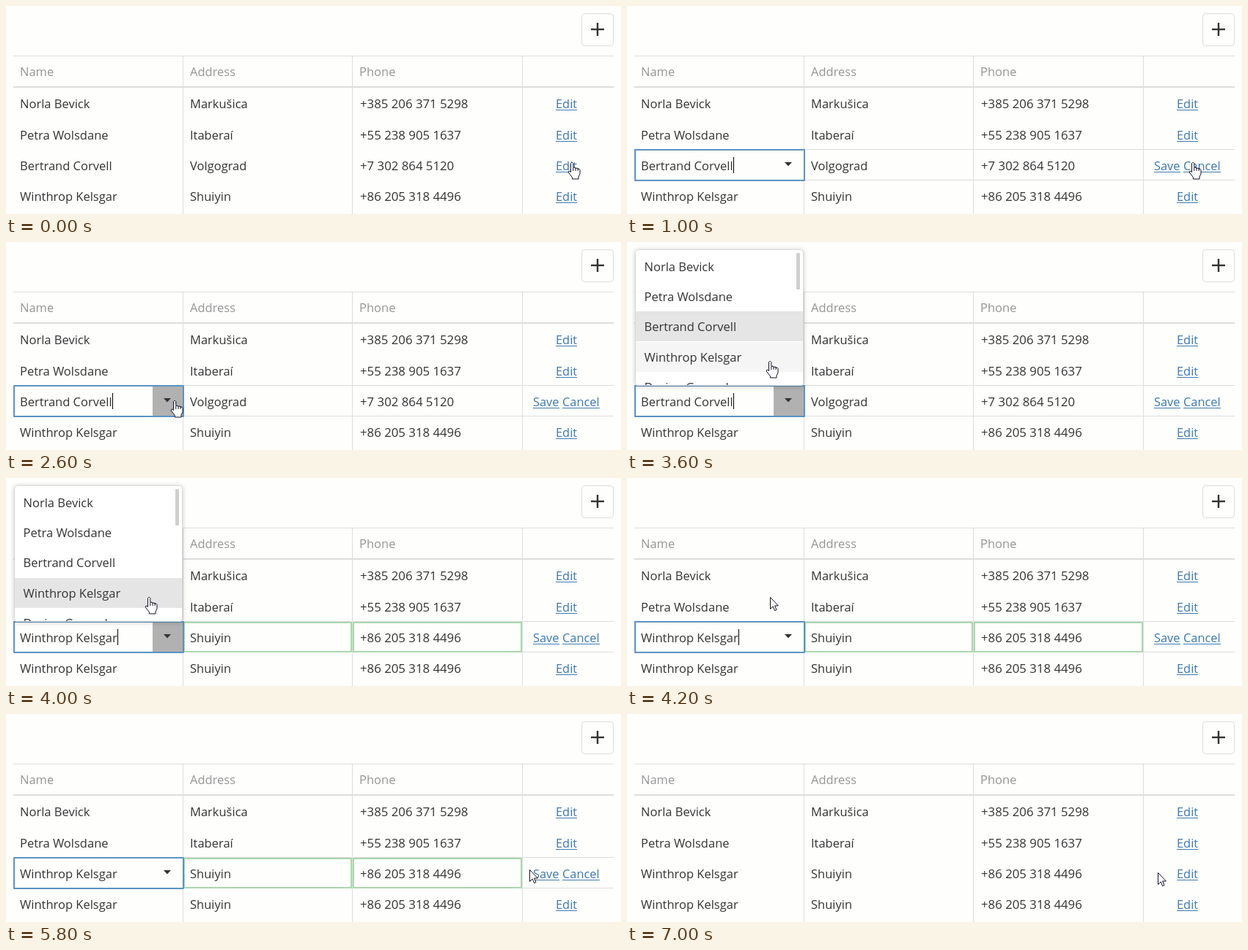
An HTML page with a canvas for the animation above (7.4 s loop, 839 by 285 pixels).

```html
<!DOCTYPE html>
<html lang="en">
<head>
<meta charset="utf-8">
<title>Editable grid</title>
<style>
html, body { margin: 0; width: 100%; height: 100%; overflow: hidden; background: #fefefd; }
canvas { display: block; width: 839px; height: 285px; }
</style>
</head>
<body>
<canvas id="stage"></canvas>
<script>
const W = 839, H = 285, LOOP = 7400;
const canvas = document.getElementById('stage');
const ctx = canvas.getContext('2d');
const dpr = window.devicePixelRatio || 1;
canvas.width = W * dpr;
canvas.height = H * dpr;

const LINE = '#dddddd', INK = '#333333', LINK = '#3c78b0', BG = '#fefefd';
const BASE = [140, 183, 225, 267];
const COL = [19, 251, 482];
const people = [
  ['Norla Bevick', 'Markušica', '+385 206 371 5298'],
  ['Petra Wolsdane', 'Itaberaí', '+55 238 905 1637'],
  ['Bertrand Corvell', 'Volgograd', '+7 302 864 5120'],
  ['Winthrop Kelsgar', 'Shuiyin', '+86 205 318 4496'],
  ['Dorina Gosmel']
];

function setFont(size) {
  ctx.font = size + 'px "Open Sans", "Noto Sans", sans-serif';
}

function text(str, x, y, color = INK, size = 16.5) {
  setFont(size);
  ctx.fillStyle = color;
  ctx.fillText(str, x, y);
  return ctx.measureText(str).width;
}

function link(str, x, y) {
  const w = text(str, x, y, LINK, 16.4);
  rect(x, y + 2, Math.round(w), 1, LINK);
}

function rect(x, y, w, h, color) {
  ctx.fillStyle = color;
  ctx.fillRect(x, y, w, h);
}

function frame(x, y, w, h, color) {
  ctx.strokeStyle = color;
  ctx.lineWidth = 2;
  ctx.strokeRect(x + 1, y + 1, w - 2, h - 2);
}

function roundBox(x, y, w, h, r) {
  ctx.beginPath();
  ctx.roundRect(x, y, w, h, r);
}

function addButton() {
  roundBox(785.5, 10.5, 43, 44, 4);
  ctx.fillStyle = BG;
  ctx.fill();
  ctx.strokeStyle = LINE;
  ctx.lineWidth = 1;
  ctx.stroke();
  rect(798, 30.8, 18, 2.4, INK);
  rect(805.8, 23, 2.4, 18, INK);
}

function grid(s) {
  rect(10, 68, 819, 1, LINE);
  rect(10, 110, 819, 2, LINE);
  for (const x of [241, 472, 704]) rect(x, 68, 1, H - 68, LINE);
  ['Name', 'Address', 'Phone'].forEach((h, i) => text(h, COL[i], 96, '#959595'));

  if (s.editing) {
    rect(10, 196, 819, 1, LINE);
    rect(10, 238, 819, 1, LINE);
  }
  BASE.forEach((y, i) => {
    const p = people[i === 2 && s.changed ? 3 : i];
    text(p[0], COL[0], y);
    text(p[1], COL[1], y);
    text(p[2], COL[2] + 1, y, INK, 16.8);
    if (i === 2 && s.editing) {
      link('Save', 719, y);
      link('Cancel', 759, y);
    } else {
      link('Edit', 750, y);
    }
  });
}

function editor(s) {
  if (s.changed) {
    frame(242, 197, 230, 42, '#abd6ad');
    frame(473, 197, 231, 42, '#abd6ad');
  }
  if (s.button) rect(200, 198, 41, 40, s.button);
  ctx.fillStyle = INK;
  ctx.beginPath();
  ctx.moveTo(215, 214);
  ctx.lineTo(225, 214);
  ctx.lineTo(220, 219.5);
  ctx.fill();
  frame(10, 196, 233, 44, '#5b93c4');
  if (s.caret) {
    setFont(16.5);
    const w = ctx.measureText(people[s.changed ? 3 : 2][0]).width;
    rect(Math.round(COL[0] + w), 207, 1, 22, '#000000');
  }
}

function popup(s) {
  ctx.save();
  ctx.shadowColor = 'rgba(0,0,0,.22)';
  ctx.shadowBlur = 6;
  ctx.shadowOffsetY = 1;
  roundBox(11, 10, 230, 187, 4);
  ctx.fillStyle = '#ffffff';
  ctx.fill();
  ctx.restore();

  ctx.save();
  roundBox(11.5, 10.5, 229, 186, 4);
  ctx.strokeStyle = '#d9d9d9';
  ctx.lineWidth = 1;
  ctx.stroke();
  roundBox(12, 11, 228, 185, 4);
  ctx.clip();
  const picked = s.changed ? 3 : 2;
  people.forEach((p, i) => {
    const y = Math.round(12.5 + i * 41.4);
    const hover = s.y >= y && s.y < y + 41 && s.y < 196;
    if (i === picked) rect(12, y, 228, 41, '#e5e5e5');
    else if (hover) rect(12, y, 228, 41, '#f5f5f5');
    text(p[0], 23.5, y + 27);
  });
  roundBox(231, 15, 5, 50, 1);
  ctx.fillStyle = '#cfcfcf';
  ctx.fill();
  ctx.restore();
}

function shape(points, x, y) {
  ctx.beginPath();
  points.forEach(([px, py]) => ctx.lineTo(x + px, y + py));
  ctx.closePath();
  ctx.fillStyle = '#ffffff';
  ctx.fill();
  ctx.strokeStyle = '#111122';
  ctx.lineWidth = 1;
  ctx.lineJoin = 'round';
  ctx.stroke();
}

const pointers = {
  arrow(x, y) {
    shape([[.5, .5], [.5, 16.5], [4.2, 13], [6.6, 18.7], [9, 17.6], [6.6, 12], [11.4, 12]], x, y);
  },
  hand(x, y) {
    shape([[-1.5, 1.5], [-.5, .5], [.8, .5], [1.8, 1.5], [1.8, 7.5], [4, 7],
      [5, 8.4], [7.2, 8], [8.2, 9.4], [10, 9.2], [11, 10.5], [11, 16],
      [9, 20], [9, 23], [.5, 23], [.3, 20.5], [-4.8, 14], [-4.3, 12.4],
      [-3, 12.2], [-1.5, 13.8]], x, y);
    ctx.beginPath();
    for (const px of [1.8, 5, 8.1]) {
      ctx.moveTo(x + px, y + 8);
      ctx.lineTo(x + px, y + 12);
    }
    ctx.stroke();
  },
  beam(x, y) {
    rect(x - .5, y - 7, 1, 14, '#111111');
    for (const e of [-8, 7]) {
      rect(x - 3.5, y + e, 3, 1, '#111111');
      rect(x + .5, y + e, 3, 1, '#111111');
    }
  }
};

const clamp = v => Math.max(0, Math.min(1, v));
const easeOut = p => 1 - (1 - p) ** 3;
const easeInOut = p => p * p * (3 - 2 * p);

function move(t, t0, t1, a, b, ease) {
  const p = ease(clamp((t - t0) / (t1 - t0)));
  return [a[0] + (b[0] - a[0]) * p, a[1] + (b[1] - a[1]) * p].map(Math.round);
}

function cursor(t) {
  if (t < 1800) return ['hand', 772, 214];
  if (t < 2800) {
    const p = move(t, 1800, 2600, [496, 216], [230, 217], easeOut);
    return [p[0] < 241 ? 'hand' : 'beam', ...p];
  }
  if (t < 4200) return ['hand', ...move(t, 2800, 3600, [230, 217], [195, 163], easeInOut)];
  if (t < 6000) return ['arrow', ...move(t, 4200, 5800, [195, 163], [714, 213], easeInOut)];
  return [t < 6400 ? 'hand' : 'arrow', 724, 217];
}

// The screen refreshes in 200 ms ticks, with pauses around the first click.
function tick(t) {
  if (t < 1000) return 0;
  if (t >= 1200 && t < 1800) return 1200;
  return Math.min(7000, Math.floor(t / 200) * 200);
}

function stateAt(t) {
  const [kind, x, y] = cursor(t);
  const open = t >= 2800 && t < 4200;
  const focus = t < 2500 ? 1000 : t < 4000 ? 2500 : 4000;
  return {
    kind, x, y, open,
    editing: t >= 1000 && t < 6400,
    changed: t >= 4000,
    button: open || t === 2600 ? '#b1b1b1' : t === 2400 ? '#e8e8e8' : null,
    caret: (t - focus) % 1060 < 530
  };
}

function draw(now) {
  const s = stateAt(tick(now % LOOP));
  ctx.setTransform(dpr, 0, 0, dpr, 0, 0);
  rect(0, 0, W, H, BG);
  addButton();
  grid(s);
  if (s.editing) editor(s);
  if (s.open) popup(s);
  pointers[s.kind](s.x, s.y);
}

const start = performance.now();
function loop() {
  draw(performance.now() - start);
  requestAnimationFrame(loop);
}
loop();
</script>
</body>
</html>
```
